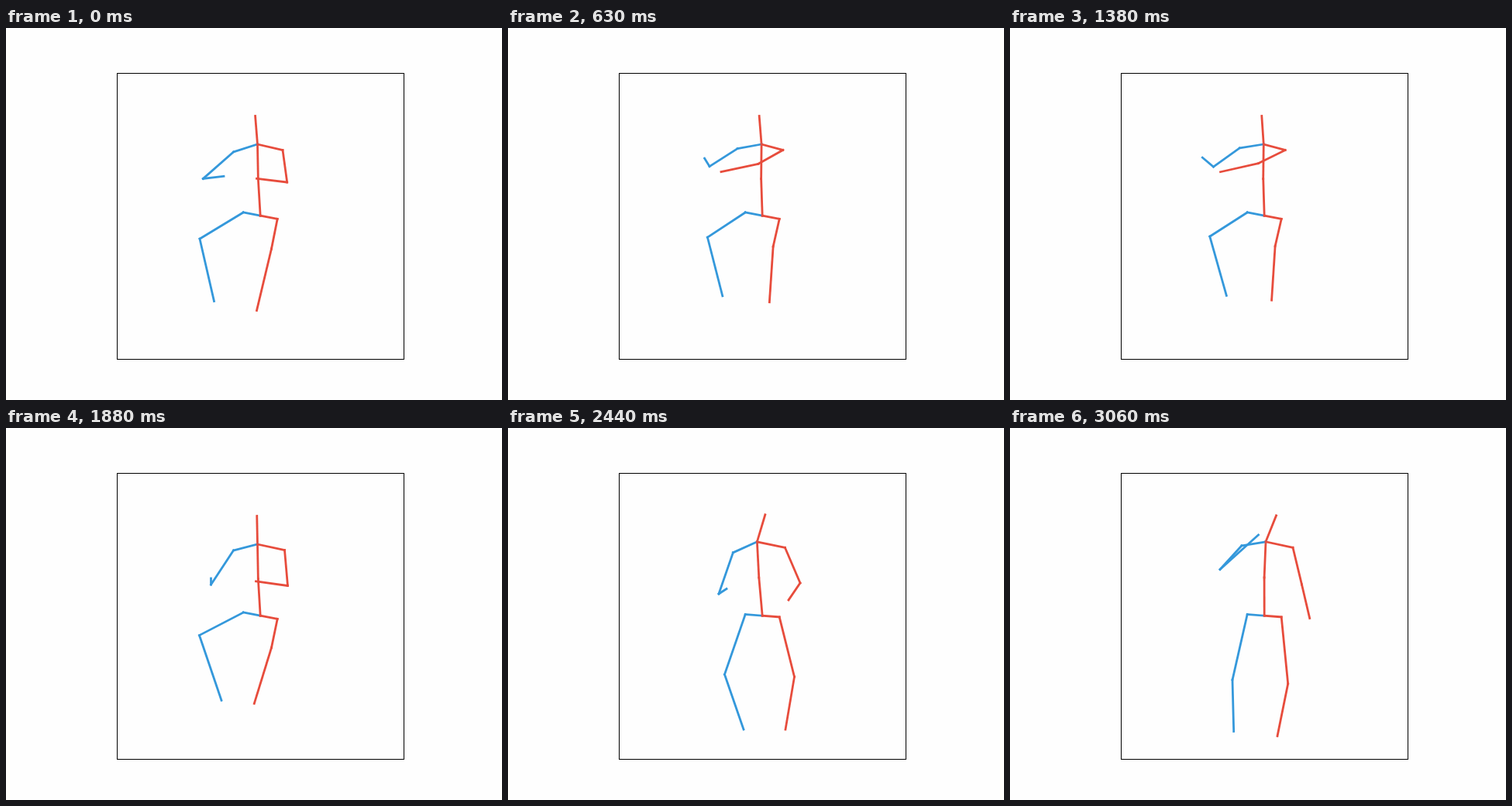
Animation, 640 px wide and 480 px high, one loop 3.12 s. Source, as an HTML page with a canvas:

```html
<!DOCTYPE html>
<html lang="en">
<head>
<meta charset="utf-8">
<title>Stick figure</title>
<style>
  html, body { margin: 0; width: 100%; height: 100%; overflow: hidden; background: #fefefe; }
  canvas { display: block; }
</style>
</head>
<body>
<canvas id="stage" width="640" height="480"></canvas>
<script>
const ctx = document.getElementById('stage').getContext('2d');
const LOOP = 3120, LAST = 49;
const BLUE = '#3498db', ORANGE = '#e74c3c';

const smooth = p => p * p * (3 - 2 * p);
const lateSmooth = p => smooth(p ** 1.6);
const mix = (a, b, k) => a + (b - a) * k;

// Each arm is elbow then hand, each leg knee then foot
const seated = {
  stand: 0, neckX: 324.5, tilt: -0.08, drop: 10, span: 32.5,
  armB: [[254.3, 194.5], [281, 191.3]], armO: [[362.7, 199], [323.5, 194.3]],
  legB: [[250, 272], [268.5, 352.5]], legO: [[342.5, 285], [323.5, 364.5]]
};
const reaching = {
  ...seated, neckX: 328, drop: 4, span: 26,
  armB: [[262, 173], [244, 160]], armO: [[309, 167], [258, 182.5]],
  legB: [[260, 269.4], [279.7, 343.5]], legO: [[342, 281], [342.2, 350]]
};
const gathered = {
  ...seated, tilt: -0.02, drop: 8, span: 35,
  armB: [[264.5, 202], [264.5, 194]], armO: [[363.5, 203.5], [322.5, 197.7]],
  legB: [[249.5, 267.5], [278, 351.5]], legO: [[342.5, 283.5], [320.3, 355.5]]
};
const standing = {
  stand: 1, neckX: 321.4, tilt: 0.29, drop: 14, span: 36,
  armB: [[272, 214], [282, 207.5]], armO: [[377, 200], [362, 222]],
  legB: [[279.5, 318], [304, 389]], legO: [[369.5, 321], [358, 389]]
};
const waving = {
  ...standing, neckX: 330, tilt: 0.38, drop: 5, span: 35,
  armB: [[271, 182.5], [320.5, 138]], armO: [[376.5, 202], [386.7, 245.5]],
  legB: [[287, 325], [288.7, 391.5]], legO: [[358.7, 330], [345, 397.5]]
};

// Turns a pose into five chains of points; trunk joints follow from the neck and pelvis
function skeleton({ stand, neckX, tilt, drop, span, armB, armO, legB, legO }) {
  const px = 328.2, py = 242.2;
  const neckY = 150 - 3.2 * stand;
  const hipY = 4.2 - 2.5 * stand;
  const pelvis = [px, py], neck = [neckX, neckY];
  const spine = [(px + neckX) / 2 - 1, (py + neckY) / 2 - 1.5];
  const head = [neckX + 36.5 * Math.sin(tilt), neckY - 36.5 * Math.cos(tilt)];
  return [
    [pelvis, [px - 22, py - hipY], ...legB],
    [pelvis, [px + 22, py + hipY], ...legO],
    [pelvis, spine, neck, head],
    [neck, [neckX - 31, neckY + drop], ...armB],
    [neck, [neckX + span, neckY + 7.5], ...armO]
  ];
}

const colors = [BLUE, ORANGE, ORANGE, BLUE, ORANGE];

const moves = [
  { from: 0, to: 15, a: seated, b: reaching, ease: smooth },
  { from: 15, to: 30, a: reaching, b: gathered, ease: lateSmooth },
  { from: 30, to: 39, a: gathered, b: standing, ease: smooth },
  { from: 39, to: LAST, a: standing, b: waving, ease: smooth }
].map(m => ({ ...m, a: skeleton(m.a), b: skeleton(m.b) }));

function chainsAt(tick) {
  const { from, to, a, b, ease } = moves.find(m => tick <= m.to);
  const k = ease((tick - from) / (to - from));
  return a.map((chain, c) => chain.map(([x, y], j) =>
    [mix(x, b[c][j][0], k), mix(y, b[c][j][1], k)]));
}

function draw(tick) {
  ctx.fillStyle = '#fefefe';
  ctx.fillRect(0, 0, 640, 480);

  ctx.lineWidth = 1;
  ctx.strokeStyle = '#000';
  ctx.strokeRect(143.5, 58.5, 370, 369);

  ctx.lineWidth = 2.78;
  ctx.lineCap = 'square';
  chainsAt(tick).forEach((chain, c) => {
    ctx.strokeStyle = colors[c];
    for (let i = 1; i < chain.length; i++) {
      ctx.beginPath();
      ctx.moveTo(...chain[i - 1]);
      ctx.lineTo(...chain[i]);
      ctx.stroke();
    }
  });
}

// 16 ticks per second, each starting on a whole hundredth of a second
function tickAt(ms) {
  const cs = Math.floor((ms % LOOP) / 10);
  return Math.min(LAST, Math.ceil((cs + 0.5) / 6.25) - 1);
}

const start = performance.now();
function loop() {
  draw(tickAt(performance.now() - start));
  requestAnimationFrame(loop);
}
loop();
</script>
</body>
</html>
```
